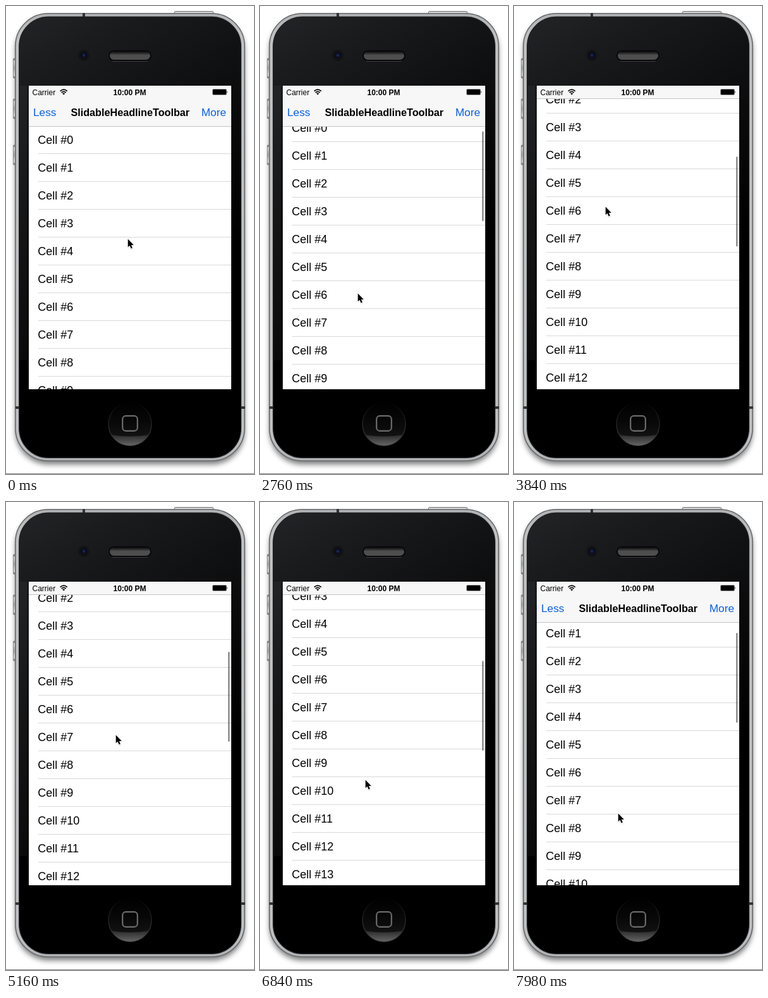
An HTML page that plays this animation: 392x740 px, repeating every 8000 ms.

```html
<!DOCTYPE html>
<html lang="en">
<head>
<meta charset="utf-8">
<title>Collapsing bar demo</title>
<style>
  html, body { margin: 0; width: 100%; height: 100%; overflow: hidden; background: #fff; }
  svg { display: block; width: 100%; height: 100%; }
  text { font-family: "Liberation Sans", Arial, Helvetica, sans-serif; }
  .cell { font-size: 18px; }
  .link { font-size: 17.3px; fill: #0b61e1; }
  .title { font-size: 16.2px; font-weight: bold; text-anchor: middle; }
  .status { font-size: 12px; }
</style>
</head>
<body>
<svg viewBox="0 0 392 740" xmlns="http://www.w3.org/2000/svg">
  <defs>
    <linearGradient id="metal" x1="0" y1="0" x2="0" y2="1">
      <stop offset="0" stop-color="#b0b2b4"/>
      <stop offset=".05" stop-color="#c0c1c3"/>
      <stop offset=".95" stop-color="#bebfc1"/>
      <stop offset="1" stop-color="#b0b2b4"/>
    </linearGradient>
    <linearGradient id="glass" x1="0" y1="0" x2=".3" y2="1">
      <stop offset="0" stop-color="#232427"/>
      <stop offset=".14" stop-color="#1a1b1d"/>
      <stop offset=".45" stop-color="#0b0b0c"/>
      <stop offset=".72" stop-color="#000"/>
    </linearGradient>
    <linearGradient id="button" x1="0" y1="0" x2="0" y2="1">
      <stop offset="0" stop-color="#666"/>
      <stop offset=".15" stop-color="#d8d8d8"/>
      <stop offset=".5" stop-color="#a8a8a8"/>
      <stop offset=".85" stop-color="#dedede"/>
      <stop offset="1" stop-color="#666"/>
    </linearGradient>
    <linearGradient id="home" x1="0" y1="0" x2="0" y2="1">
      <stop offset="0" stop-color="#000"/>
      <stop offset=".45" stop-color="#080808"/>
      <stop offset="1" stop-color="#181818"/>
    </linearGradient>
    <linearGradient id="rim" x1="0" y1="0" x2="0" y2="1">
      <stop offset="0" stop-color="#1a1a1a" stop-opacity="0"/>
      <stop offset=".35" stop-color="#191919"/>
      <stop offset="1" stop-color="#404040"/>
    </linearGradient>
    <linearGradient id="glow" x1="0" y1="0" x2="0" y2="1">
      <stop offset="0" stop-color="#2a2a2a"/>
      <stop offset="1" stop-color="#646464"/>
    </linearGradient>
    <linearGradient id="recess" x1="0" y1="0" x2="0" y2="1">
      <stop offset="0" stop-color="#000" stop-opacity=".85"/>
      <stop offset=".45" stop-color="#000" stop-opacity="0"/>
    </linearGradient>
    <radialGradient id="lens">
      <stop offset="0" stop-color="#1b2f72"/>
      <stop offset=".3" stop-color="#121b42"/>
      <stop offset=".55" stop-color="#0a0c16"/>
      <stop offset="1" stop-color="#121316"/>
    </radialGradient>
    <pattern id="mesh" width="2" height="2" patternUnits="userSpaceOnUse">
      <rect width="2" height="2" fill="#222"/>
      <rect width="1" height="1" fill="#7a7a7a"/>
      <rect x="1" y="1" width="1" height="1" fill="#7a7a7a"/>
    </pattern>
    <filter id="blur" x="-20%" y="-20%" width="140%" height="140%"><feGaussianBlur stdDeviation="4.5"/></filter>
    <filter id="soft" x="-50%" y="-50%" width="200%" height="200%"><feGaussianBlur stdDeviation="1"/></filter>
    <clipPath id="screen"><rect x="36" y="126" width="320" height="480"/></clipPath>
    <path id="arrow" d="M0 0V12.8L2.9 10.2 4.9 15 7.2 14 5.2 9.4H9.2Z"/>
  </defs>

  <rect width="392" height="740" fill="#fff"/>
  <rect y="739" width="392" height="1" fill="#85858b"/>

  <rect x="15" y="18" width="362" height="707" rx="52" fill="#000" opacity=".5" filter="url(#blur)"/>
  <g id="buttons" stroke="#777" stroke-width=".8" fill="url(#button)"></g>
  <rect x="266.5" y="8.5" width="61" height="7" rx="1" fill="#dcdcde" stroke="#666"/>
  <rect x="14.8" y="11.8" width="362.4" height="707.4" rx="52" fill="url(#metal)" stroke="#66686a" stroke-width="1.6"/>
  <g fill="#333">
    <rect x="121" y="11" width="4" height="7"/>
    <rect x="15" y="633" width="7" height="4"/>
    <rect x="371" y="633" width="7" height="4"/>
  </g>
  <rect x="20.8" y="17.3" width="350.6" height="697" rx="46.5" fill="url(#glass)" stroke="#1d1e20" stroke-width="1.4"/>
  <path d="M22 126H33V560H22Z" fill="#fff" opacity=".04"/>

  <circle cx="123" cy="78" r="9" fill="#121316"/>
  <circle cx="123" cy="78" r="6.5" fill="url(#lens)"/>
  <rect x="162" y="70" width="68" height="17" rx="8.5" fill="#08080a"/>
  <rect x="164" y="72" width="64" height="13" rx="6.5" fill="url(#mesh)"/>
  <rect x="164" y="72" width="64" height="13" rx="6.5" fill="url(#recess)"/>
  <path d="M168 87.5H224" stroke="#3b3c3f" stroke-width="1"/>

  <circle cx="196" cy="661" r="34" fill="url(#home)" stroke="url(#rim)" stroke-width="1.5"/>
  <path d="M166.6 678Q196 683 225.4 678A34 34 0 0 1 166.6 678Z" fill="url(#glow)"/>
  <rect x="184.2" y="648.2" width="23.6" height="23.6" rx="5" fill="none" stroke="#6c6c6c" stroke-width="2.2"/>

  <g clip-path="url(#screen)">
    <rect x="36" y="126" width="320" height="480" fill="#fff"/>
    <g id="list"></g>
    <rect id="thumb" x="351" width="2.5" rx="1.25" fill="#000"/>
    <g id="nav">
      <rect x="36" y="80" width="320" height="110" fill="#f7f7f7"/>
      <rect x="36" y="190" width="320" height="1" fill="#c4c4c6"/>
      <g id="items">
        <text class="link" x="43" y="174">Less</text>
        <text class="title" x="196.3" y="174">SlidableHeadlineToolbar</text>
        <text class="link" x="348" y="174" text-anchor="end">More</text>
      </g>
    </g>
    <rect x="36" y="126" width="320" height="20" fill="#f7f7f7"/>
    <text class="status" x="41.5" y="140.5">Carrier</text>
    <text class="status" x="195.5" y="140.5" text-anchor="middle" font-weight="bold">10:00 PM</text>
    <g fill="none" stroke="#000" stroke-width="1.7">
      <path d="M85.6 134.6Q91.2 129.6 96.8 134.6"/>
      <path d="M87.7 137Q91.2 133.8 94.7 137"/>
      <path d="M91.2 140.6L89.2 138.5Q91.2 136.7 93.2 138.5Z" fill="#000" stroke="none"/>
    </g>
    <rect x="326.5" y="131.5" width="22" height="9" rx="1.5" fill="none" stroke="#000" stroke-opacity=".55" stroke-width=".8"/>
    <rect x="327" y="132" width="21" height="8" rx="1"/>
    <path d="M349.4 134.2Q351.2 136 349.4 137.8Z"/>
  </g>

  <g id="cursor">
    <use href="#arrow" y=".7" opacity=".4" filter="url(#soft)"/>
    <use href="#arrow" x="-.3" y="-.5" fill="#000" stroke="#fff" stroke-width="2" paint-order="stroke"/>
  </g>
</svg>
<script>
  const LOOP = 8000, STEP = 60, ROW = 44, BAR = 44, HOLD = 20;
  const $ = id => document.getElementById(id);

  // time, pointer x, pointer y, scroll offset
  const keys = [
    [0, 193, 369, 0], [120, 323, 260, 0], [240, 250, 137, 0], [360, 63, 330, 0],
    [480, 140, 551, 0], [540, 188, 503, 0], [660, 188, 503, 0], [900, 58, 380, 0],
    [1020, 95, 171, 0], [1260, 181, 352, 0], [1380, 181, 352, 0],
    [1680, 181, 385, -16], [1860, 181, 385, -16], [1920, 181, 386, -17],
    [2280, 170, 440, 0], [2460, 160, 475, 0], [2760, 155, 455, 19],
    [3480, 147, 332, 138], [3840, 145, 318, 152], [4140, 148, 300, 170],
    [4380, 150, 300, 217], [4800, 168, 430, 87], [5160, 174, 369, 148],
    [5340, 172, 310, 207], [5580, 172, 310, 326], [6120, 165, 500, 136],
    [6840, 167, 440, 195], [7080, 166, 385, 251], [7260, 160, 291, 251],
    [7980, 165, 493, 48]
  ];

  const clamp = (v, lo, hi) => Math.min(hi, Math.max(lo, v));

  const slope = (i, c) => i < 0 || i >= keys.length - 1 ? 0
    : (keys[i + 1][c] - keys[i][c]) / (keys[i + 1][0] - keys[i][0]);

  // Harmonic mean keeps each curve from overshooting its keys.
  function tangent(i, c) {
    const a = slope(i - 1, c), b = slope(i, c);
    return a * b > 0 ? 2 * a * b / (a + b) : 0;
  }

  function track(t, c) {
    let i = 0;
    while (i < keys.length - 2 && keys[i + 1][0] <= t) i++;
    const [p, q] = [keys[i], keys[i + 1]];
    const h = q[0] - p[0], u = clamp((t - p[0]) / h, 0, 1), v = 1 - u;
    return p[c] * (1 + 2 * u) * v * v + q[c] * u * u * (3 - 2 * u)
      + h * u * v * (tangent(i, c) * v - tangent(i + 1, c) * u);
  }

  // The bar follows the scroll distance, limited to its own height.
  const hidden = [];
  let depth = 0, last = HOLD;
  for (let t = 0; t < LOOP; t += STEP) {
    const now = Math.max(HOLD, track(t, 3));
    depth = clamp(depth + now - last, 0, BAR);
    last = now;
    hidden.push(Math.round(depth));
  }

  $("buttons").innerHTML = [83, 147, 220].map(y =>
    `<rect x="11.5" y="${y}" width="6" height="31" rx="1"/>`).join("");

  $("list").innerHTML = Array.from({ length: 30 }, (_, i) => {
    const y = 190 + i * ROW;
    return `<text class="cell" x="50.3" y="${y + 28}">Cell #${i}</text>
      <rect x="51" y="${y + 43}" width="305" height="1" fill="#d9d9dc"/>`;
  }).join("");

  const move = (id, x, y) => $(id).setAttribute("transform", `translate(${x} ${y})`);

  function draw(ms) {
    const n = Math.floor(ms % LOOP / STEP), t = n * STEP;
    const scroll = Math.round(track(t, 3)), d = hidden[n];
    move("list", 0, -scroll);
    move("nav", 0, -d);
    $("items").setAttribute("opacity", 1 - d / BAR);
    const thumb = $("thumb");
    thumb.setAttribute("y", 192.5 + 0.301 * Math.max(scroll, 0));
    thumb.setAttribute("height", 142 + Math.min(scroll, 0));
    thumb.setAttribute("opacity", 0.45 * clamp((t - 1380) / 180, 0, 1));
    move("cursor", Math.round(track(t, 1)), Math.round(track(t, 2)));
  }

  const start = performance.now();
  function tick() {
    draw(performance.now() - start);
    requestAnimationFrame(tick);
  }
  tick();
</script>
</body>
</html>
```
